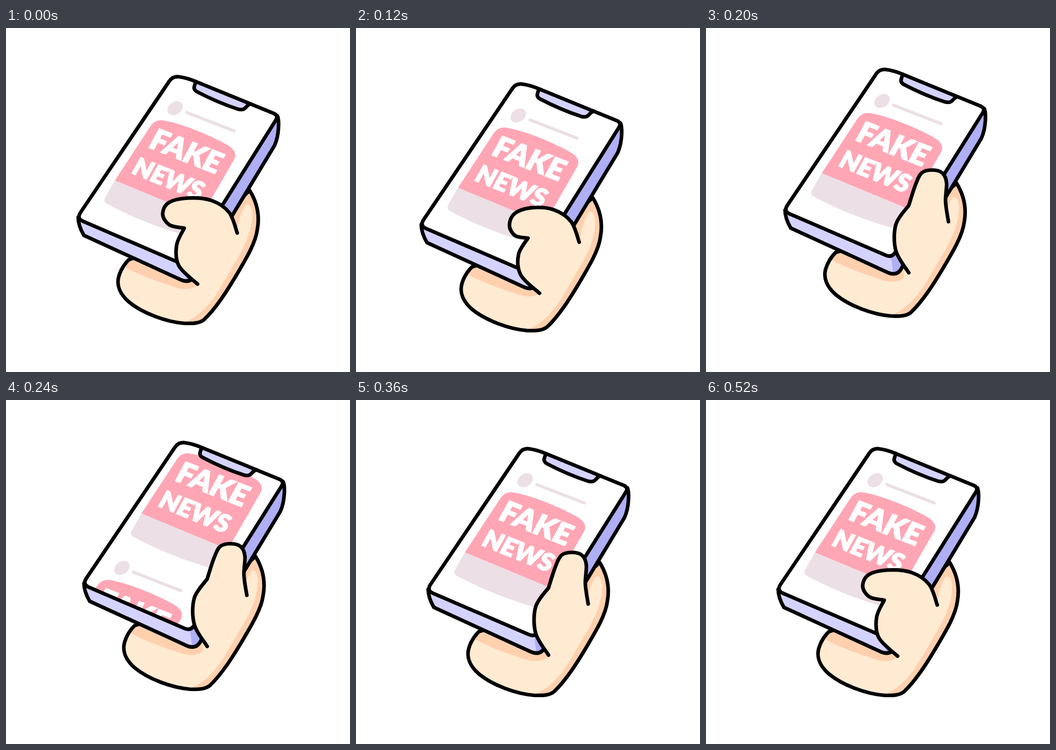
An HTML page that plays this animation: 720 px wide and 720 px high, repeating every 0.6 s.

```html
<!DOCTYPE html>
<html lang="en">
<head>
<meta charset="utf-8">
<title>Scrolling the feed</title>
<style>
  html, body { margin: 0; width: 100%; height: 100%; overflow: hidden; background: #fff; }
  svg { display: block; width: 100vw; height: 100vh; }
  .line { fill: none; stroke: #000; stroke-width: 7.6; stroke-linecap: round; stroke-linejoin: round; }
  .skin { fill: #ffead2; }
  .shade { fill: #ffd0ae; }
  .lilac { fill: #d4d3ff; }
  .violet { fill: #afaff6; }
  .grey { fill: #ecdfe6; }
  .pink { fill: #ffa6b5; }
  text { font-family: Lato, "Open Sans", sans-serif; font-weight: 900; fill: #fff; stroke: #fff; stroke-width: 2; }
</style>
</head>
<body>
<svg viewBox="0 0 720 720">
  <defs>
    <path id="palm" d="M510 340C526 366 531 395 526 422C522 452 500 487 480 521C462 551 440 586 415 610C406 618 392 619 372 618C335 615 286 597 258 574C238 557 231 538 236 520C240 506 248 494 257 485L400 440Z"/>
    <path id="face" d="M342 111Q349 101 361 102Q378 104 397 112L512 159L561 179Q571 184 564 194L383 482Q376 497 362 491L160 404Q148 398 156 386Z"/>
    <path id="body" d="M568 184C572 192 572 224 562 246L475 390L396 516Q387 536 366 527L163 434C156 422 151 408 151 396L350 300Z"/>
    <path id="notch" d="M397 112C396 121 389 126 399 133C420 144 455 160 486 170C504 174 501 161 512 159"/>
    <clipPath id="inPalm"><use href="#palm"/></clipPath>
    <clipPath id="inFace"><use href="#face"/></clipPath>
    <clipPath id="inBody"><use href="#body"/></clipPath>
    <g id="post">
      <ellipse class="grey" cx="354" cy="168" rx="17.5" ry="13" transform="rotate(-35 354 168)"/>
      <path d="M378.5 177L477.5 215.5" fill="none" stroke="#ecdfe6" stroke-width="6.5" stroke-linecap="round"/>
      <path class="grey" d="M228 319L208 354Q202 364 213 369C262 395 315 416 369 432Q382 434 388 425L409 394Z"/>
      <path class="pink" d="M228 319L302 206Q311 192 326 193C362 198 420 221 460 243Q486 257 478 274L409 394Z"/>
      <text font-size="62" transform="translate(295 249) rotate(21.5) skewX(-7)">FAKE</text>
      <text font-size="52" transform="translate(260 303) rotate(22) skewX(-7)">NEWS</text>
    </g>
  </defs>

  <g id="scene">
    <use href="#palm" class="skin"/>
    <g clip-path="url(#inPalm)" class="shade">
      <path d="M460 400L510 335L540 360L535 430L420 630L374 616C400 607 426 580 445 550L480 490C505 450 516 415 515 390C514 370 505 363 498 376C490 392 486 405 484 427L460 430Z"/>
      <path d="M240 496C282 520 326 533 355 543Q385 552 400 538L395 480L257 470Z"/>
    </g>
    <use href="#palm" class="line"/>

    <use href="#body" class="lilac"/>
    <path clip-path="url(#inBody)" class="violet" d="M372 488L379 540L480 520L620 220L568 175Z"/>
    <use href="#body" class="line"/>
    <use href="#face" fill="#fff"/>
    <g clip-path="url(#inFace)">
      <g id="feed">
        <use href="#post"/>
        <use href="#post" x="-167" y="265"/>
      </g>
    </g>
    <use href="#notch" class="lilac"/>
    <use href="#notch" class="line"/>
    <use href="#face" class="line"/>

    <g id="thumb">
      <path class="skin"/>
      <path class="line"/>
    </g>
  </g>
</svg>
<script>
const LOOP = 600, STEP = 40, LAST = 520;
const PERIOD = [-167, 265], SWAY = [-14.4, 15.2], PUSH = [7, -6.5];

// Key points of the thumb, from its right side over the tip to the heel; NOTCH is the sharp one.
const NOTCH = 7;
const curled = [[484, 429], [467, 386], [430, 361], [380, 356], [340, 366], [328, 390],
  [342, 412], [373, 419], [357, 455], [362, 498], [401, 536]];
const raised = [[486, 427], [480, 385], [482, 345], [473, 325], [452, 319], [430, 325],
  [417, 350], [403, 393], [376, 433], [376, 488], [403, 534]];
// Bending pulls the thumb down and squeezes its tip towards the palm.
const bent = curled.map(([x, y], i) => {
  const reach = i <= NOTCH ? Math.max(0, 400 - x) : 0;
  return [x - 5 + 0.28 * reach, y + 8 + 0.12 * reach];
});

const tracks = {
  sway: [[0, 0], [120, 1], [200, -1], [360, 0]],
  scroll: [[200, 0], [320, 1]],
  bend: [[80, 0], [160, 1], [200, 1], [360, 0]],
  lift: [[160, 0], [200, 1], [360, 1], [520, 0]],
  push: [[160, 0], [200, 1], [360, 0]],
};

const ease = p => p * p * (3 - 2 * p);
const mix = (a, b, p) => a + (b - a) * p;
const blend = (a, b, p) => a.map((pt, i) => pt.map((v, k) => mix(v, b[i][k], p)));

function at(track, t) {
  const i = track.findIndex(key => key[0] > t);
  if (i === 0) return track[0][1];
  if (i < 0) return track[track.length - 1][1];
  const [t0, a] = track[i - 1], [t1, b] = track[i];
  return mix(a, b, ease((t - t0) / (t1 - t0)));
}

// Cubic segments through the points (Catmull-Rom).
function smooth(pts) {
  let d = "";
  for (let i = 0; i < pts.length - 1; i++) {
    const a = pts[i], b = pts[i + 1];
    const before = pts[i - 1] || a, after = pts[i + 2] || b;
    const c1 = a.map((v, k) => v + (b[k] - before[k]) / 6);
    const c2 = b.map((v, k) => v - (after[k] - a[k]) / 6);
    d += `C${[...c1, ...c2, ...b]}`;
  }
  return d;
}

const outline = pts => `M${pts[0]}${smooth(pts.slice(0, NOTCH + 1))}${smooth(pts.slice(NOTCH))}`;

const scene = document.getElementById("scene");
const feed = document.getElementById("feed");
const thumb = document.getElementById("thumb");
const move = (el, [x, y], k) => el.setAttribute("transform", `translate(${x * k} ${y * k})`);

function draw(t) {
  const now = name => at(tracks[name], t);
  move(scene, SWAY, now("sway"));
  // Scrolling up by one whole post brings the next one into place.
  move(feed, PERIOD, -now("scroll"));
  move(thumb, PUSH, now("push"));
  const d = outline(blend(blend(curled, bent, now("bend")), raised, now("lift")));
  for (const path of thumb.children) path.setAttribute("d", d);
}

const start = performance.now();
function tick() {
  const t = (performance.now() - start) % LOOP;
  draw(Math.min(Math.floor(t / STEP) * STEP, LAST));
  requestAnimationFrame(tick);
}
draw(0);
requestAnimationFrame(tick);
</script>
</body>
</html>
```
